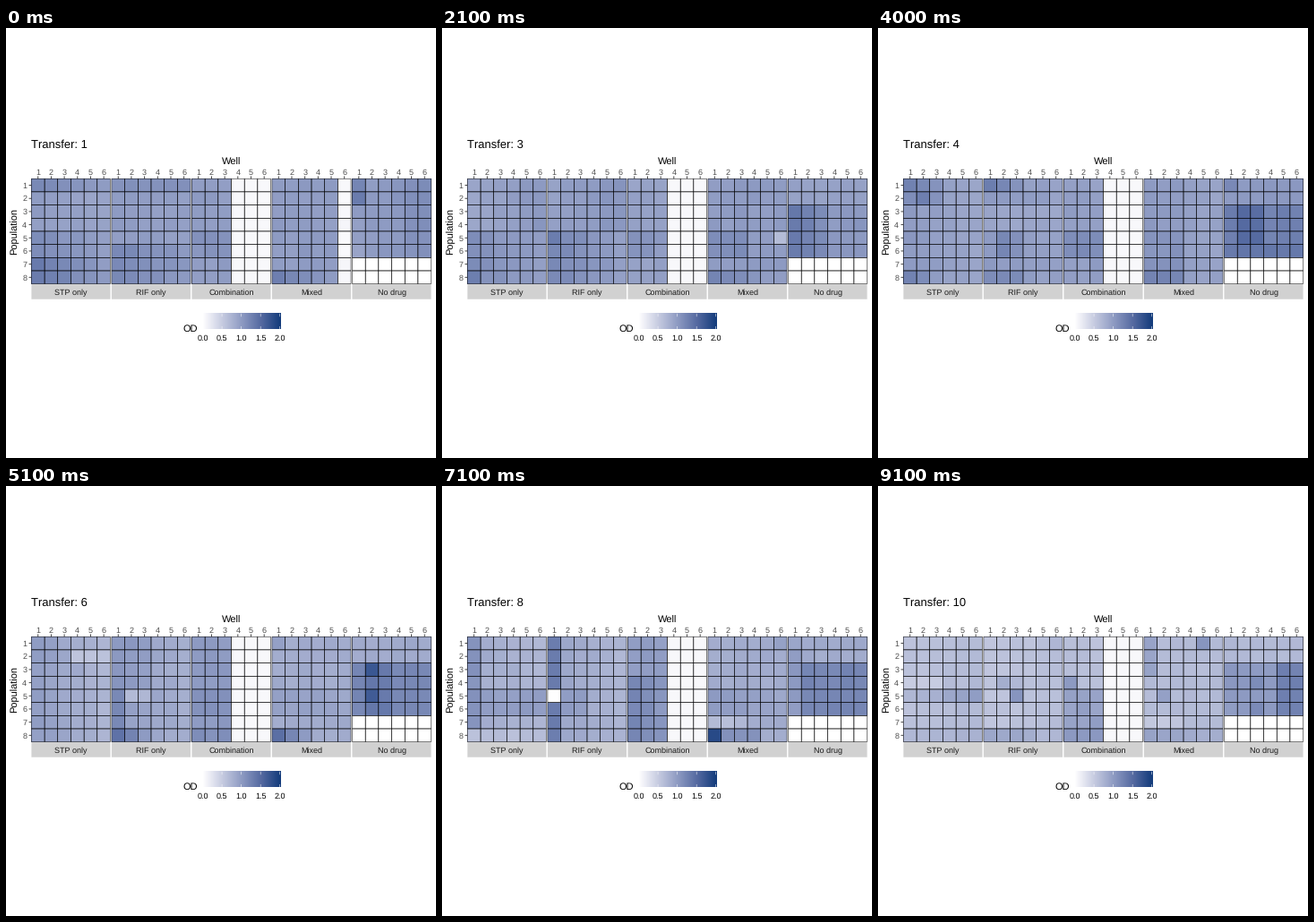
Animation, 480 px wide and 480 px high, one loop 10000 ms. Source, as a matplotlib script:

```python
import numpy as np
import matplotlib.pyplot as plt
from matplotlib.animation import FuncAnimation
from matplotlib.collections import LineCollection
from matplotlib.colors import LinearSegmentedColormap
from matplotlib.patches import Rectangle

plt.rcParams["font.family"] = "Liberation Sans"
plt.rcParams["text.hinting"] = "none"
plt.rcParams["text.hinting_factor"] = 1

SIZE, DPI = 480, 72
CELL, TOP, LEFT, PITCH = 14.68, 168.2, 28.4, 89.52
ROWS, COLS = 8, 6
PANELS = ["STP only", "RIF only", "Combination", "Mixed", "No drug"]
S, R, C, M, N = range(5)
ALL = "1-8"

blues = LinearSegmentedColormap.from_list("od", [
    (0, "#ffffff"), (0.03, "#f7f7fb"), (0.25, "#c5cae0"), (0.5, "#8d9ac2"),
    (0.75, "#5469a0"), (1, "#123b7b")])
blues.set_bad("white")

noise = np.random.default_rng(7)
shared_noise = noise.normal(0, 0.015, (5, ROWS, COLS))


def span(text):
    first, last = text.split("-") if "-" in text else (text, text)
    return slice(int(first) - 1, int(last))


def plate(*patches):
    """Paint (panel, rows, columns, left OD[, right OD]) in order."""
    od = np.zeros((5, ROWS, COLS))
    for panel, rows, cols, left, *right in patches:
        block = od[panel, span(rows), span(cols)]
        block[:] = np.linspace(left, right[0] if right else left, block.shape[1])
    od += shared_noise + noise.normal(0, 0.012, od.shape)
    od[C, :, 3:] = 0.06
    od[N, 6:] = np.nan
    return od


plates = {}
plates[1] = plate(
    (S, ALL, "1-6", 0.98, 0.9), (S, "1", "1-6", 1.18, 0.98),
    (S, "5-6", "1-6", 1.15, 0.95), (S, "7-8", "1-6", 1.32, 0.98),
    (R, ALL, "1-6", 0.97, 0.95), (R, "1", "1-6", 1.08),
    (R, "6-8", "1-6", 1.18, 1.0),
    (C, ALL, "1-3", 0.97), (C, "5-6", "1-3", 1.08),
    (M, ALL, "1-5", 0.98), (M, "8", "1-5", 1.25, 1.0), (M, ALL, "6", 0.06),
    (N, "1-6", "1-6", 0.94, 1.12), (N, "1", "1", 1.2), (N, "2", "1", 1.33))
plates[3] = plate(
    (S, "1-4", "1-6", 0.88, 1.02), (S, "5-8", "1-6", 1.12, 0.96),
    (S, "8", "1", 1.3),
    (R, "1-4", "1-6", 0.93, 1.05), (R, "5-8", "1-6", 1.18, 0.94),
    (R, "5", "1", 1.3),
    (C, ALL, "1-3", 0.92), (C, "5-6", "1-3", 1.1, 1.02),
    (M, ALL, "1-6", 0.98), (M, "5-6", "1-3", 1.12),
    (M, "8", "1-6", 1.2, 0.95), (M, "5", "6", 0.65),
    (N, "1-2", "1-6", 0.92), (N, "3-6", "1-3", 1.32, 1.15),
    (N, "3-6", "4-6", 1.02))
plates["4 to 5"] = plate(
    (S, ALL, "1-6", 1.0, 0.88), (S, "1", "1-3", 1.25, 1.1),
    (S, "2", "1-3", 1.1), (S, "2", "2", 1.25), (S, "8", "1-2", 1.25, 1.15),
    (R, ALL, "1-6", 1.0, 0.92), (R, "1", "1-3", 1.28, 1.06),
    (R, "3-4", "1-6", 0.88), (R, "5-6", "2-3", 1.2, 1.08),
    (R, "8", "1-3", 1.15),
    (C, ALL, "1-3", 0.95), (C, "5-6", "1-3", 1.14),
    (M, ALL, "1-6", 1.0, 0.9), (M, "5-7", "1-3", 1.06),
    (M, "8", "1-3", 1.2),
    (N, "1-2", "1-6", 1.0), (N, "1", "1", 1.15),
    (N, "3-6", "1", 1.27), (N, "3-6", "2-3", 1.48),
    (N, "3-6", "4-6", 1.24, 1.28), (N, "6", "1-6", 1.35))
plates[6] = plate(
    (S, ALL, "1-6", 0.96, 0.72), (S, "2", "4-6", 0.57),
    (R, ALL, "1-6", 0.95, 0.8), (R, "1-4", "1-3", 1.02, 0.96),
    (R, "5-8", "1", 1.18), (R, "5", "2-3", 0.66), (R, "8", "1-3", 1.4, 0.98),
    (C, ALL, "1-3", 1.0), (C, "5-6", "1-3", 1.1), (C, "8", "1-3", 1.1),
    (M, ALL, "1-6", 0.82), (M, "5-6", "1-6", 0.95, 0.88),
    (M, "1", "1", 0.95), (M, "8", "1-3", 1.4, 0.98),
    (N, "1-2", "1-6", 0.82), (N, "3-6", "1-6", 1.2),
    (N, "3-6", "2-3", 1.34), (N, "3", "2", 1.68), (N, "5", "2", 1.68))
plates[8] = plate(
    (S, ALL, "2-6", 0.8, 0.72), (S, "5-6", "2-6", 0.96), (S, ALL, "1", 1.08),
    (S, "8", "1-6", 0.62),
    (R, ALL, "2-6", 0.86, 0.72), (R, "5-6", "2-3", 0.96),
    (R, ALL, "1", 1.3), (R, "5", "1", 0.03),
    (C, ALL, "1-3", 0.96), (C, "4-8", "1-3", 1.2, 1.04),
    (M, ALL, "1-6", 0.82), (M, "5-6", "1-6", 1.0, 0.88),
    (M, "7", "1-3", 0.65), (M, "8", "1-4", 1.08), (M, "8", "1", 1.8),
    (M, "1", "6", 0.95),
    (N, "1-2", "1-6", 0.82), (N, "2", "1", 0.95), (N, "3-6", "1", 1.0),
    (N, "3-6", "2-6", 1.2))
plates[9] = plate(
    (S, ALL, "1-6", 0.7, 0.74), (S, "2-4", "2-5", 0.6),
    (S, "1", "1", 0.98), (S, "1-2", "5-6", 0.88), (S, "5-6", "1", 1.12),
    (S, "6", "2-3", 0.72, 0.52),
    (R, ALL, "1-6", 0.84, 0.68), (R, "2", "1", 1.15), (R, "5", "1", 1.2),
    (R, "7", "1", 1.22), (R, "8", "1-3", 0.86),
    (C, "1-3", "1-3", 0.72), (C, "1", "1", 0.86), (C, "4", "1-3", 0.52),
    (C, "5-8", "1-3", 1.02), (C, "5", "1", 1.2),
    (M, ALL, "1-6", 0.78, 0.9), (M, "4-6", "1", 1.02), (M, "5", "2", 1.0),
    (M, "7", "2", 0.5), (M, "8", "1-6", 0.9, 0.78),
    (N, "1-2", "1-6", 0.8, 0.92), (N, "2", "1", 1.15),
    (N, "3-6", "1-6", 0.98, 1.16), (N, "4", "4", 1.36), (N, "6", "4", 1.32))
plates[10] = plate(
    (S, ALL, "1-6", 0.6, 0.67), (S, "4", "1-3", 0.52),
    (S, "5", "1-6", 0.7, 0.96), (S, "8", "1-6", 0.75, 0.68),
    (R, ALL, "1-6", 0.56, 0.62), (R, "1", "6", 0.72), (R, "4", "2-3", 0.8, 0.7),
    (R, "5", "3", 1.05), (R, "8", "1-3", 0.8),
    (C, "1-4", "1-3", 0.62), (C, "5-8", "1-3", 0.92), (C, "4", "1", 1.0),
    (M, ALL, "1-6", 0.66), (M, "1-3", "1", 0.92), (M, "1", "5", 1.05),
    (M, "5", "2", 0.92), (M, "7", "1-3", 0.52), (M, "8", "1-6", 0.8, 0.7),
    (N, "1-2", "1-6", 0.66), (N, "3-6", "1-4", 1.0), (N, "3-6", "5-6", 1.26),
    (N, "4", "3", 1.15), (N, "6", "3", 1.15))
# The last transfer leaves the bottom row as it was.
plates[10][:, 7] = plates[9][:, 7]


def mix(a, b, t):
    return (1 - t) * a + t * b


plates[2] = mix(plates[1], plates[3], 0.5)
plates[2][N] = plates[3][N]
plates[2][S, :, :4] = plates[3][S, :, :4]
plates[7] = mix(plates[6], plates[8], 0.5)
plates[7][N, :, 1:] = plates[8][N, :, 1:]
plates[7][R, 4, 0] = plates[6][R, 4, 0]
plates[4] = mix(plates["4 to 5"], plates[6], -0.25)
plates[5] = mix(plates["4 to 5"], plates[6], 0.25)


def state(frame):
    """Transfer number shown and OD values for a 100 ms step."""
    k, step = divmod(frame, 10)
    steps = {0: 0, 1: 0, 8: 2}.get(k, 1)
    if step >= steps:
        return k + 1, plates[k + 1]
    t = (step + 1) / (steps + 1)
    return k + (t > 0.5), mix(plates[k], plates[k + 1], t)


fig = plt.figure(figsize=(SIZE / DPI, SIZE / DPI), dpi=DPI, facecolor="white")
ax = fig.add_axes([0, 0, 1, 1])
ax.axis("off")


def label(x, y, text, size=8.8, color="black", ha="center", **kw):
    return ax.text(x, y, text, size=size, color=color, ha=ha,
                   va=kw.pop("va", "baseline"), **kw)


def lines(segments, color, width):
    ax.add_collection(LineCollection(segments, colors=color, linewidths=width,
                                     capstyle="butt", zorder=3, snap=False))


ys = TOP + CELL * np.arange(ROWS + 1)
bottom = ys[-1]
meshes, outline, inner, ticks = [], [], [], []
for i, name in enumerate(PANELS):
    xs = LEFT + PITCH * i + CELL * np.arange(COLS + 1)
    meshes.append(ax.pcolormesh(xs, ys, plates[1][i], cmap=blues, vmin=0, vmax=2))
    verticals = [[(x, TOP), (x, bottom)] for x in xs]
    horizontals = [[(xs[0], y), (xs[-1], y)] for y in ys]
    for group in (verticals, horizontals):
        outline += [group[0], group[-1]]
        inner += group[1:-1]
    ax.add_patch(Rectangle((xs[0], bottom + 0.2), CELL * COLS, 16.9,
                           fc="#d1d1d1", ec="none", snap=False))
    label(xs.mean(), 298, name, color="#1a1a1a")
    for well, x in enumerate(xs[:-1] + CELL / 2, 1):
        label(x, 163.6, well, color="#4d4d4d")
        ticks.append([(x, TOP - 2.8), (x, TOP)])
for row, y in enumerate(ys[:-1] + CELL / 2, 1):
    label(23.2, y + 3.2, row, color="#4d4d4d", ha="right")
    ticks.append([(LEFT - 2.8, y), (LEFT, y)])
# Neighbouring tiles both stroke the edge they share.
lines(outline + inner * 2, "black", 0.5)
lines(ticks, "#333333", 0.9)

title = label(28, 133.6, "", size=13.2, ha="left")
label(251.2, 153, "Well", size=11)
label(9.8, 227, "Population", size=11, rotation=90, va="center")

# Colour bar
BAR_X, BAR_W, BAR_Y, BAR_H = 219.5, 86.2, 318.8, 17.6
ax.imshow(np.linspace(0, 2, 300)[None], cmap=blues, vmin=0, vmax=2,
          extent=(BAR_X, BAR_X + BAR_W, BAR_Y + BAR_H, BAR_Y), aspect="auto")
bar_ticks = []
for od in np.arange(0, 2.1, 0.5):
    x = BAR_X + BAR_W * od / 2
    label(x, 349, f"{od:.1f}")
    bar_ticks += [[(x, BAR_Y), (x, BAR_Y + 3.4)],
                  [(x, BAR_Y + BAR_H - 3.4), (x, BAR_Y + BAR_H)]]
lines(bar_ticks, "white", 0.5)
label(197, 339, "OD", size=11, ha="left")

ax.set_xlim(0, SIZE)
ax.set_ylim(SIZE, 0)


def update(frame):
    transfer, od = state(frame)
    title.set_text(f"Transfer: {transfer}")
    for mesh, values in zip(meshes, od):
        mesh.set_array(np.ma.masked_invalid(values))
    return [title, *meshes]


anim = FuncAnimation(fig, update, frames=100, interval=100, repeat=True,
                     repeat_delay=0, blit=False)
plt.show()
```
